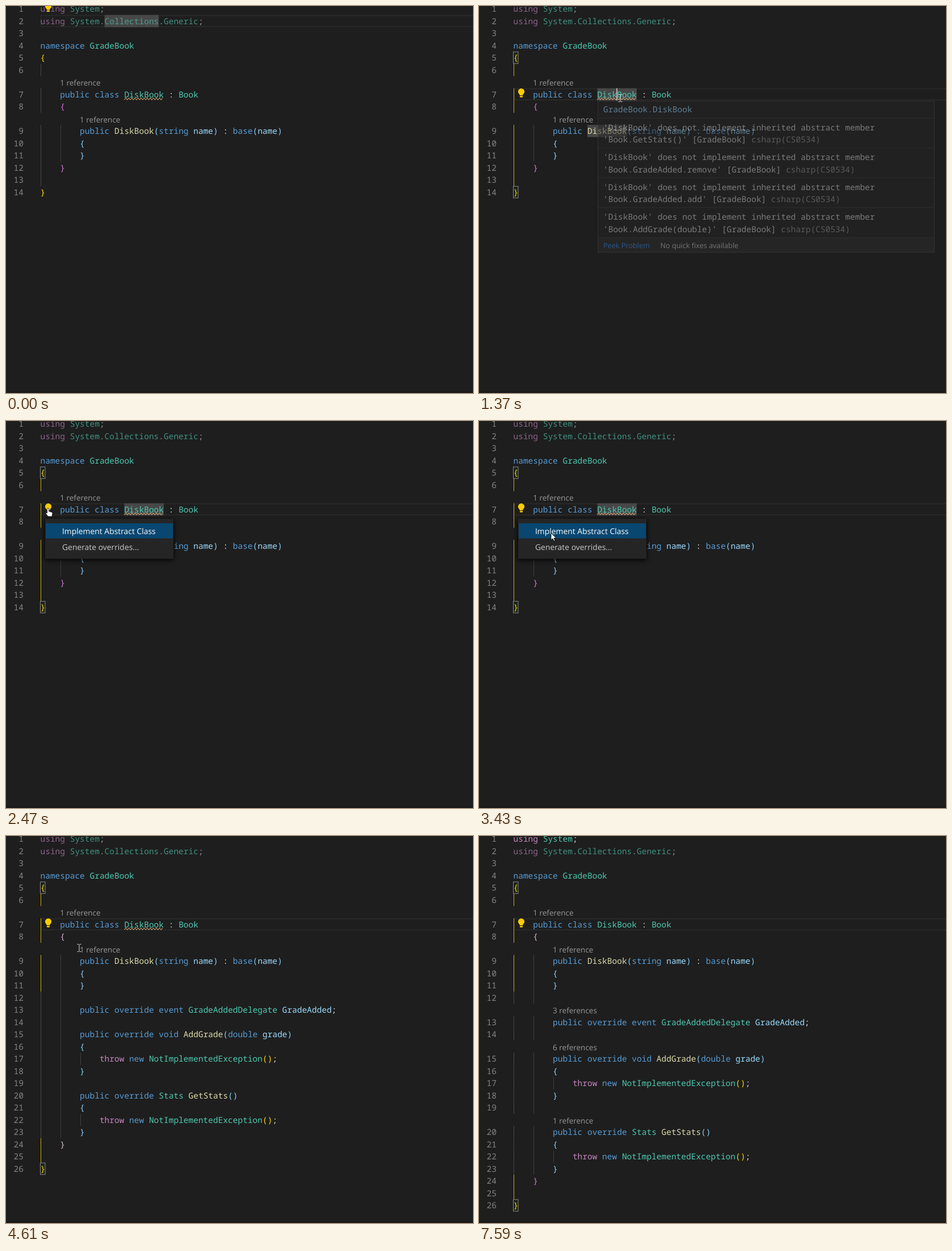
Animation of 823 by 681 pixels, one loop 7660 ms. Source, as an HTML page:

```html
<!DOCTYPE html>
<html lang="en">
<head>
<meta charset="utf-8">
<title>Implement abstract class</title>
<style>
  html, body { margin: 0; width: 100%; height: 100%; overflow: hidden; background: #1e1e1e; }
  svg { display: block; width: 823px; height: 681px; }
  text { white-space: pre; text-rendering: geometricPrecision; fill: #d4d4d4; }
  .code { font: 14.5px "Noto Sans Mono", "DejaVu Sans Mono", monospace; }
  .ui { font-family: "Open Sans", "Noto Sans", sans-serif; }
  .lens { font-size: 13.5px; fill: #999; }
  .num { fill: #858585; text-anchor: end; }
  .dim { opacity: .667; }
  .first { opacity: var(--first); }
  .word { fill: #474747; }
  .pair { fill: #1c231c; stroke: #888; }
  .rule { stroke: #3c3c3d; }
</style>
</head>
<body>
<svg id="stage" viewBox="0 0 823 681"></svg>
<script>
const LOOP = 7660, CHAR = 8.7, LEFT = 60.5, ROW = 21.5;
const rowTop = row => row * ROW - 5.75;
const baseline = row => row * ROW + 10.1;
const colX = col => LEFT + col * CHAR;

const GOLD = '#ffd700', ORCHID = '#da70d6', SKY = '#87cefa', PLAIN = '#d4d4d4', FUNC = '#dcdcaa';
const palette = {
  '#569cd6': 'namespace public class string base override event void double new',
  '#c586c0': 'using throw',
  '#4ec9b0': 'System Collections Generic GradeBook DiskBook Book GradeAddedDelegate NotImplementedException Stats',
  [FUNC]: 'AddGrade GetStats',
  '#9cdcfe': 'name grade GradeAdded'
};
const wordColor = {};
for (const [color, words] of Object.entries(palette))
  for (const word of words.split(' ')) wordColor[word] = color;

// Rows whose text starts with @ are reference labels without a line number.
const head = `using System;
using System.Collections.Generic;

namespace GradeBook
{

    @1 reference
    public class DiskBook : Book
    {
        @1 reference
        public DiskBook(string name) : base(name)
        {
        }`.split('\n');
const tail = ['    }', '', '}'];
const members = `
        @3 references
        public override event GradeAddedDelegate GradeAdded;

        @6 references
        public override void AddGrade(double grade)
        {
            throw new NotImplementedException();
        }

        @1 reference
        public override Stats GetStats()
        {
            throw new NotImplementedException();
        }`.split('\n');
const isLens = line => line.includes('@');

function tokenColor(token, col, line) {
  if ('{}'.includes(token)) return { 0: GOLD, 4: ORCHID, 8: SKY }[col];
  if ('()'.includes(token)) return line.includes('throw') ? GOLD : SKY;
  if (token === 'DiskBook' && line[col + 8] === '(') return FUNC;
  return wordColor[token] || PLAIN;
}

function codeRow(line, row, tint) {
  const spans = line.replace(/\w+|\S|\s+/g, (token, col) =>
    token.trim() ? `<tspan fill="${tint || tokenColor(token, col, line)}">${token}</tspan>` : token);
  const cls = row === 0 ? 'first' : row === 1 ? 'dim' : '';
  return `<text class="code ${cls}" x="${LEFT}" y="${baseline(row)}">${spans}</text>`;
}

const guide = (col, row, color) =>
  `<rect x="${Math.round(61 + col * CHAR)}" y="${rowTop(row)}" width="1" height="${ROW}" fill="${color}"/>`;

const pairBox = row => `<rect class="pair" x="60.5" y="${rowTop(row) + .5}" width="8.5" height="${ROW - 1}"/>`;

function layout(on, body, { plain, pale, lensOn = '0-7660' } = {}) {
  const lines = [...head, ...body, ...tail];
  const close = lines.length - 3, last = lines.length - 1;
  let number = 0, grey = '', gold = '', text = '';
  lines.forEach((line, row) => {
    const inserted = row >= head.length && row < close;
    if (isLens(line)) {
      const lens = `<text class="ui lens" x="${colX(line.indexOf('@'))}" y="${baseline(row) + 1.3}">${line.trim().slice(1)}</text>`;
      text += inserted ? `<g data-on="${lensOn}">${lens}</g>` : lens;
      return;
    }
    if (row > 4 && row < last) {
      grey += guide(0, row, '#484848');
      if (!inserted) gold += guide(0, row, '#cfae08');
    }
    if (row > 9 && row < close) grey += guide(4, row, '#404040');
    if (line.includes('throw')) grey += guide(8, row, '#404040');
    let tint = plain && inserted && !/[{}]/.test(line) ? PLAIN : '';
    if (body.length && row === 8) tint = '#d6b4d5';
    if (pale && row === close) tint = '#d0c0d0';
    text += `<text class="code num" x="31" y="${baseline(row)}">${++number}</text>` + codeRow(line, row, tint);
  });
  return `<g data-on="${on}">${grey}<g data-on="980-7660">${gold}${pairBox(4)}${pairBox(last)}</g>${text}</g>`;
}

const currentLine = (on, row) =>
  `<rect data-on="${on}" x="62" y="${rowTop(row) + 1}" width="780" height="${ROW - 2}" fill="none" stroke="#282828" stroke-width="2"/>`;
const wordBox = (on, col, row, length) =>
  `<rect data-on="${on}" class="word" x="${colX(col)}" y="${rowTop(row)}" width="${length * CHAR}" height="${ROW}"/>`;
const bulb = (on, row) =>
  `<path data-on="${on}" transform="translate(74.5 ${row * ROW + .5})" fill="#fc0"
    d="M-2.6 6.2C-2.8 4-5.6 3-5.6-.4A5.6 5.6 0 0 1 5.6-.4C5.6 3 2.8 4 2.6 6.2ZM-2.6 7.2H2.6V8.6Q2.6 9.8 1.4 9.8H-1.4Q-2.6 9.8-2.6 8.6Z"/>`;

function squiggle() {
  const start = colX(17), step = 2.7;
  let d = `M${start} 165`;
  for (let i = 1; i * step <= 8 * CHAR; i++) d += `L${start + i * step} ${i % 2 ? 162 : 165}`;
  return `<path data-on="0-6170" d="${d}" fill="none" stroke="#cfa672" stroke-width="1.1"/>`;
}

function hover() {
  const problems = ['GetStats()', 'GradeAdded.remove', 'GradeAdded.add', 'AddGrade(double)'];
  const text = problems.map((member, i) => {
    const y = 219 + i * 52.4, place = `'Book.${member}' [GradeBook] `;
    return `<path class="rule" d="M210 ${y - 21.5}H803"/>
      <text class="code" x="219" y="${y}">'DiskBook' does not implement inherited abstract member</text>
      <text class="code" x="219" y="${y + 21.3}">${place}<tspan fill="#939393">csharp(CS0534)</tspan></text>`;
  }).join('');
  return `<g id="hover" data-on="1370-1700">
    <rect x="209.5" y="167.5" width="593" height="266" fill="#252526" stroke="#454545"/>
    <rect x="210" y="407" width="592" height="26" fill="#2c2c2d"/><path class="rule" d="M210 407.5H803"/>
    <text class="code" x="219" y="187" style="fill:#9cdcfe">GradeBook.DiskBook</text>${text}
    <g class="ui" font-size="12.7"><text x="219" y="426" style="fill:#3794ff">Peek Problem</text>
    <text x="319.5" y="426" style="fill:#ccc">No quick fixes available</text></g></g>`;
}

const menu = `<g data-on="2410-4150" class="ui" font-size="13.9">
  <rect x="69" y="172" width="226" height="70.5" fill="#252526" style="filter:drop-shadow(0 2px 4px #000)"/>
  <rect x="70" y="180" width="224" height="26.5" fill="#094771"/>
  <text x="99" y="198.5" style="fill:#fff">Implement Abstract Class</text>
  <text x="99" y="226.5" style="fill:#ccc">Generate overrides...</text></g>`;

const pointer = `<g id="mouse" data-on="190-6790">
  <path data-on="0-1840 4150-7660" d="M-3.5-6.5H-1L0-5.5 1-6.5H3.5M0-5.5V5.5M-3.5 6.5H-1L0 5.5 1 6.5H3.5" fill="none" stroke="#d8d8d8"/>
  <path data-on="1840-2890" d="M-1.5 1Q0-1 1.5 1V6L7 7.5Q8.5 8 8 10L7 15H0L-4 9.5Q-4 7.5-1.5 9Z" fill="#fff" stroke="#000" stroke-width=".8"/>
  <path data-on="2890-4150" d="M0 0V12.5L2.9 9.8 5 14.3 7 13.4 5 9H8.8Z" fill="#fff" stroke="#000" stroke-width=".8"/></g>`;

const stage = document.getElementById('stage');
stage.innerHTML = [
  '<rect width="823" height="681" fill="#1e1e1e"/><rect y="678" width="823" height="3" fill="#1a1a1a"/>',
  currentLine('0-980', 1), currentLine('980-7660', 7),
  wordBox('0-980', 13, 1, 11), wordBox('1220-4220', 17, 7, 8), wordBox('1220-4220', 15, 10, 8),
  layout('0-4220', []),
  layout('4220-4390', members.filter(line => !isLens(line)), { plain: true, pale: true }),
  layout('4390-4710', members.filter(line => !isLens(line)), { pale: true }),
  layout('4710-7660', members, { lensOn: '4920-7660' }),
  squiggle(), bulb('0-1150', 0), bulb('1220-7660', 7),
  `<rect data-on="980-1500 2030-2410 4220-4610 5100-5630 6100-6650 7210-7590" x="242" y="${rowTop(7)}" width="2" height="${ROW}" fill="#aeafad"/>`,
  hover(), menu, pointer
].join('');

const timed = [...stage.querySelectorAll('[data-on]')].map(el => ({
  el, spans: el.dataset.on.split(' ').map(span => span.split('-').map(Number))
}));
const mouse = document.getElementById('mouse'), hoverBox = document.getElementById('hover');

// Time, x, y
const path = [
  [190, 583, 575], [400, 330, 290], [570, 182, 140], [730, 249, 162], [1560, 249, 162],
  [1770, 87, 155.5], [1840, 74, 153], [2890, 74, 153], [3210, 127, 197], [4150, 127, 197],
  [4220, 129, 197], [4920, 129, 197], [5400, 254, 234], [5630, 254, 234], [6020, 280, 543],
  [6600, 280, 543], [6790, 540, 650]
];

function mouseAt(t) {
  const next = path.findIndex(key => key[0] > t);
  if (next < 1) return path[next ? path.length - 1 : 0].slice(1);
  const [from, to] = [path[next - 1], path[next]];
  const k = (t - from[0]) / (to[0] - from[0]);
  return [1, 2].map(axis => from[axis] + (to[axis] - from[axis]) * k);
}

const begin = performance.now();
function draw() {
  const t = (performance.now() - begin) % LOOP;
  for (const { el, spans } of timed)
    el.style.display = spans.some(([a, b]) => t >= a && t < b) ? '' : 'none';
  stage.style.setProperty('--first', t < 6170 ? .667 : 1);
  hoverBox.style.opacity = t < 1460 ? .5 : 1;
  mouse.setAttribute('transform', `translate(${mouseAt(t).join(' ')})`);
  requestAnimationFrame(draw);
}
draw();
</script>
</body>
</html>
```
